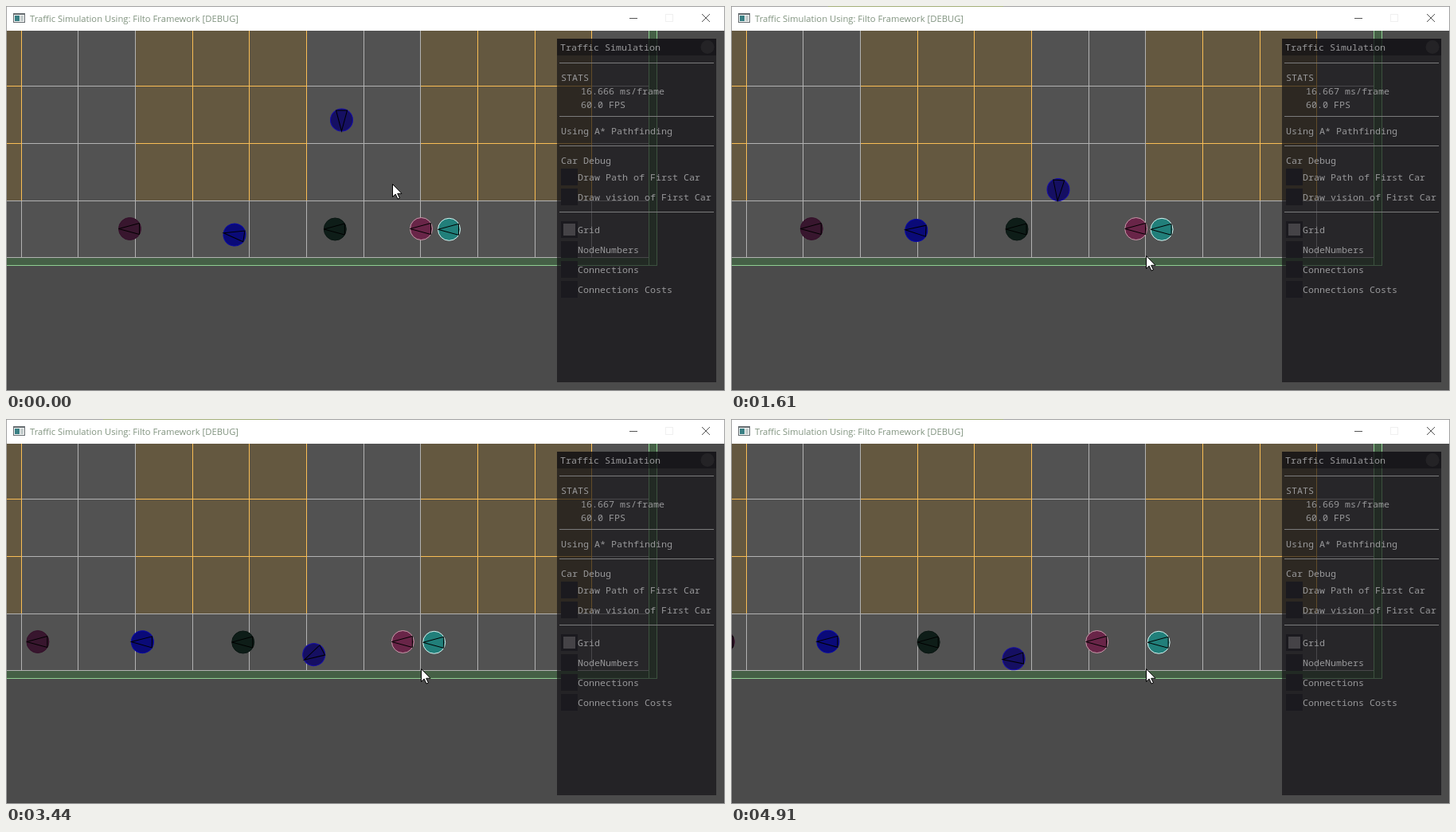
An HTML page with a canvas that plays this animation: 903 px wide and 483 px high, repeating every 4980 ms.

```html
<!DOCTYPE html>
<html lang="en">
<head>
<meta charset="utf-8">
<title>Traffic Simulation</title>
<style>
html, body { margin: 0; width: 100%; height: 100%; overflow: hidden; }
canvas { display: block; }
</style>
</head>
<body>
<canvas id="stage" width="903" height="483"></canvas>
<script>
const ctx = document.getElementById('stage').getContext('2d');
const LOOP = 4980, STEP = 70, LAST_STEP = 70;
const SPEED = 33.7;
const GREY = '#b2b2b2', ORANGE = '#f9bd55', GREEN = '#8fce92', BORDER = '#a0a0a0';
const MONO = '11.667px "Noto Sans Mono", monospace';

const columnX = i => Math.round(18.8 + 71.65 * i);
const rowY = i => Math.round(28.5 + 71.7 * i);
const isBuilding = column => (column + 5) % 5 >= 2;

const decay = (t, tau) => Math.exp(-t / tau);
const softplus = (v, width) => width * Math.log(1 + Math.exp(v / width));
const sigmoid = v => 1 / (1 + Math.exp(-v));
const smooth = v => {
  const u = Math.min(1, Math.max(0, v));
  return u * u * (3 - 2 * u);
};
// Distance covered since pulling away, approaching full speed
const pullAway = t => t > 0 ? SPEED * (t - .92 * (1 - decay(t, .92))) : 0;

const rect = (x, y, w, h, color) => {
  ctx.fillStyle = color;
  ctx.fillRect(x, y, w, h);
};
const text = (s, x, y, color = '#98989a', font = MONO) => {
  ctx.font = font;
  ctx.fillStyle = color;
  ctx.fillText(s, x, y);
};
const polygon = points => {
  ctx.beginPath();
  points.forEach(([x, y]) => ctx.lineTo(x, y));
  ctx.closePath();
};
const disc = (x, y, r, color) => {
  ctx.beginPath();
  ctx.arc(x, y, r, 0, 7);
  ctx.fillStyle = color;
  ctx.fill();
};
const outline = color => {
  ctx.lineWidth = 1;
  ctx.strokeStyle = color;
  ctx.stroke();
};

// Each pose gives x, y and heading in degrees at t seconds
const cars = [
  { fill: '#38162e', edge: '#35102a', pose: t => [155.5 - SPEED * t, 279.5, 180] },
  { fill: '#0a0a78', edge: '#0808a8',
    pose: t => [287 - SPEED * t, 279 + 8 * decay(t, 1.4), 180 + 9 * decay(t, 1.5)] },
  { fill: '#0e1d18', edge: '#0b1713', pose: t => [413.3 - SPEED * t, 280, 180] },
  { fill: '#692548', edge: '#c99bab',
    pose: t => [505.5 + 16 * decay(t, 1) - pullAway(t - 2.7), 279.5, 180] },
  { fill: '#217f7a', edge: '#d9f5f2', pose: t => [537 + 19.5 * decay(t, 1.03), 280.3, 180] },
  { fill: '#150f62', edge: '#150caa',
    pose: t => [
      421.5 - 6.5 * t - 15 * softplus(t - 2.6, .2),
      301 - softplus(158 - 55 * t, 23),
      90 + 88 * sigmoid((t - 3.05) / .45),
    ] },
];

function drawMap() {
  rect(0, 30, 903, 453, '#4b4b4b');
  rect(1, 31, 817, 295, '#456046');
  rect(1, 31, 806, 284, '#525252');
  for (let i = 0; i < 12; i++) rect(columnX(i), 31, 1, 285, GREY);
  for (let i = 1; i < 5; i++) rect(1, rowY(i), 807, 1, GREY);
  for (let i = -1; i < 11; i++) {
    if (!isBuilding(i)) continue;
    const left = Math.max(0, columnX(i)) + 1, right = columnX(i + 1);
    rect(left, 31, right - left, 213, '#645840');
    rect(right, 31, 1, 213, ORANGE);
    for (let row = 1; row < 3; row++) rect(left, rowY(row), right - left, 1, ORANGE);
  }
  rect(1, 325, 817, 1, GREEN);
  rect(807, 31, 1, 295, GREEN);
  rect(817, 31, 1, 295, GREEN);
}

function drawCar({ fill, edge, pose }, t) {
  const [x, y, heading] = pose(t);
  ctx.save();
  ctx.translate(x, y);
  ctx.rotate(heading * Math.PI / 180);
  disc(0, 0, 14, fill);
  outline(edge);
  polygon([[14, 0], [-12, -7], [-12, 7]]);
  outline('#000');
  ctx.restore();
}

function drawPanel(t) {
  rect(692, 41, 200, 431, 'rgba(16,15,19,.65)');
  rect(692, 41, 200, 21, 'rgba(8,8,12,.42)');
  disc(881, 51.5, 8.5, '#242326');
  for (const y of [71, 138, 175, 258]) rect(695, y, 194, 1, '#7b7b7c');
  text('Traffic Simulation', 696, 56);
  text('STATS', 697, 94);
  text((16.668 - .0024 * Math.cos(15 * t)).toFixed(3) + ' ms/frame', 722, 111);
  text('60.0 FPS', 722, 128);
  text('Using A* Pathfinding', 697, 161);
  text('Car Debug', 697, 198);
  const options = ['Draw Path of First Car', 'Draw vision of First Car',
    'Grid', 'NodeNumbers', 'Connections', 'Connections Costs'];
  options.forEach((label, i) => {
    const y = 204 + 25 * i + (i > 1 ? 16 : 0);
    rect(697, y, 21, 21, '#1b1a1f');
    if (label === 'Grid') rect(700, y + 3, 15, 15, '#454347');
    text(label, 718, y + 15);
  });
}

function drawWindow(t) {
  rect(0, 0, 903, 31, '#fff');
  ctx.lineWidth = 1;
  ctx.strokeStyle = BORDER;
  ctx.strokeRect(.5, .5, 902, 482);
  if (t > 0) rect(122, 0, 220, 1, '#a3ae78');

  rect(9, 9, 15, 12, '#666c70');
  rect(10, 11, 13, 9, '#f4f6f6');
  rect(11, 12, 6, 7, '#397f83');
  rect(18, 12, 4, 7, '#c5cdcd');
  text('Traffic Simulation Using: Filto Framework [DEBUG]', 30, 20,
    '#80937f', '11.25px "Open Sans", sans-serif');

  rect(783, 15, 10, 1, '#555');
  ctx.strokeStyle = '#f0f0f0';
  ctx.strokeRect(828.5, 10.5, 9, 9);
  ctx.beginPath();
  ctx.moveTo(874, 10);
  ctx.lineTo(884, 20);
  ctx.moveTo(884, 10);
  ctx.lineTo(874, 20);
  outline('#555');
}

function drawCursor(t) {
  const out = smooth(t / .63), back = smooth((t - .63) / .9);
  ctx.save();
  ctx.translate(
    Math.round(485 + 49 * out - 13 * back) + .5,
    Math.round(223 + 96 * out - 6 * back) + .5);
  polygon([[0, 0], [0, 16], [3.7, 12.6], [6.5, 18.6], [9, 17.5], [6.2, 11.8], [11.5, 11.8]]);
  ctx.fillStyle = '#fff';
  ctx.fill();
  outline('#000');
  ctx.restore();
}

function render(now) {
  const step = Math.min(LAST_STEP, Math.floor(now % LOOP / STEP));
  const t = step * STEP / 1000;
  drawMap();
  cars.forEach(car => drawCar(car, t));
  drawPanel(t);
  drawWindow(t);
  drawCursor(t);
}

const start = performance.now();
function tick() {
  render(performance.now() - start);
  requestAnimationFrame(tick);
}
tick();
</script>
</body>
</html>
```
